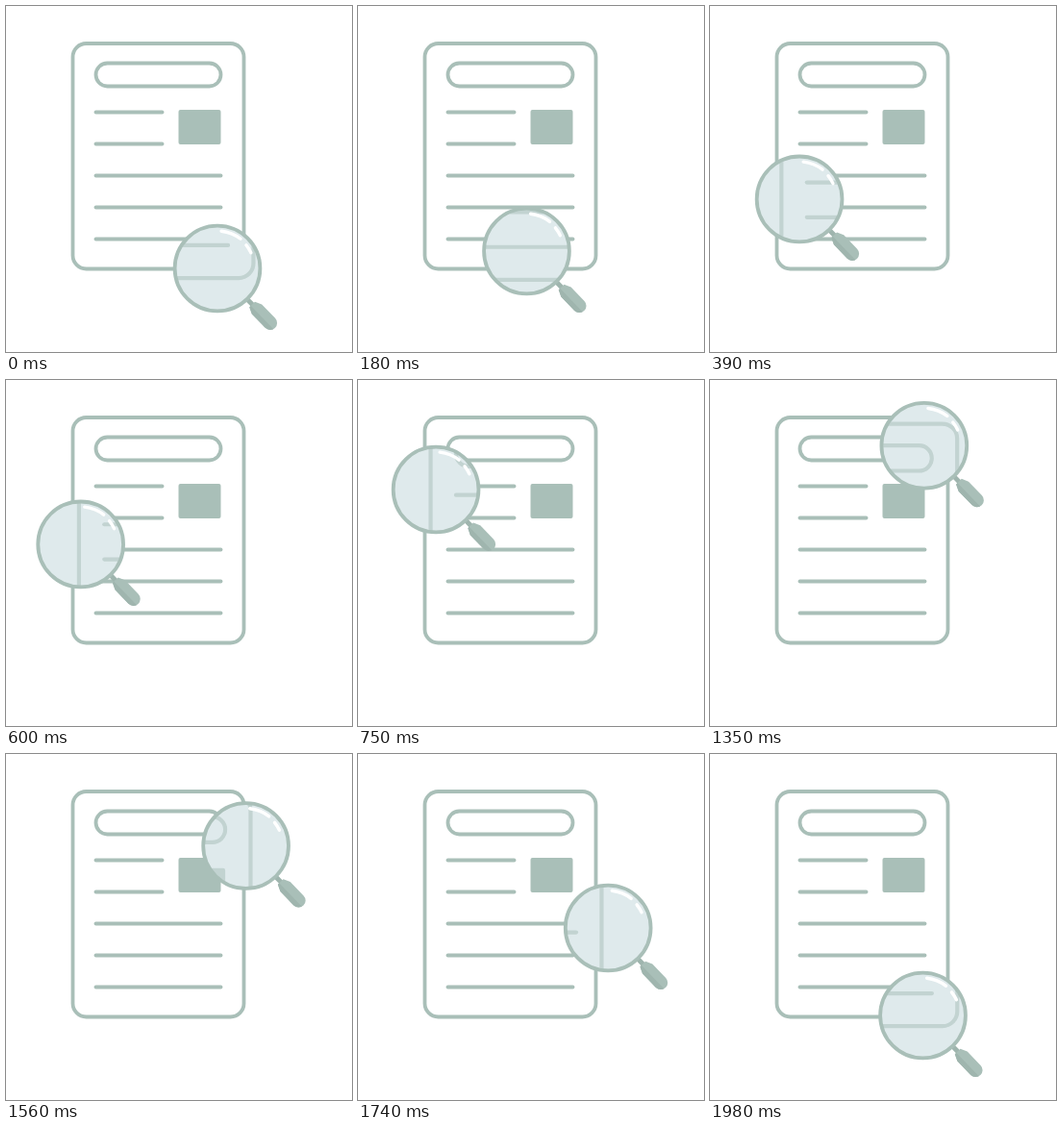
Animation, 360 px wide and 360 px high, one loop 2.01 s. Source, as an HTML page with a canvas:

```html
<!DOCTYPE html>
<html lang="en">
<head>
<meta charset="utf-8">
<title>Document search</title>
<style>
  html, body { margin: 0; width: 100%; height: 100%; overflow: hidden; background: #fff; }
  canvas { display: block; width: 360px; height: 360px; filter: blur(.45px); }
</style>
</head>
<body>
<canvas id="stage"></canvas>
<script>
const LOOP = 2010, STEP = 30, SIZE = 360, ZOOM = 1.1;
const INK = '#a9bfb8', SHADE = '#9fb5ae', GLASS = '#dfeaec', FAINT = '#c2d3d1';

const canvas = document.getElementById('stage');
const ctx = canvas.getContext('2d');
const ratio = window.devicePixelRatio || 1;
canvas.width = canvas.height = SIZE * ratio;

// Closed path of the lens centre: a rest point and the two handles that follow it
const path = [
  [[220, 273], [175, 258], [103, 222.5]],
  [[83, 187.5], [60, 130], [89, 84]],
  [[123, 71], [181, 56], [211, 48]],
  [[248, 90], [266, 150], [270, 243]]
];

const ease = t => t * t * (3 - 2 * t);
const mix = (a, b, t) => a.map((v, k) => v + (b[k] - v) * t);

function bezier(points, t) {
  while (points.length > 1) {
    points = points.slice(1).map((p, i) => mix(points[i], p, t));
  }
  return points[0];
}

function lensAt(ms) {
  const u = ms / LOOP * path.length;
  const i = Math.floor(u);
  const next = path[(i + 1) % path.length][0];
  return bezier([...path[i], next], ease(u - i));
}

function box(x, y, w, h, r) {
  ctx.beginPath();
  ctx.roundRect(x, y, w, h, r);
}

function line(x1, x2, y) {
  ctx.beginPath();
  ctx.moveTo(x1, y);
  ctx.lineTo(x2, y);
  ctx.stroke();
}

function arc(r, from, to) {
  ctx.beginPath();
  ctx.arc(0, 0, r, from * Math.PI / 180, to * Math.PI / 180);
}

function sheet(color) {
  const left = 93.5, wide = 130;
  ctx.strokeStyle = ctx.fillStyle = color;
  ctx.lineWidth = 3.8;
  ctx.lineCap = 'round';
  box(69.5, 39, 178, 234.5, 14);
  ctx.stroke();
  box(left, 59.5, wide, 24, 12);
  ctx.stroke();
  box(179.5, 108, 44, 36, 2);
  ctx.fill();
  for (let i = 0; i < 5; i++) {
    line(left, left + (i < 2 ? 69 : wide), 110.5 + 33 * i);
  }
}

function handle() {
  ctx.save();
  ctx.rotate(46 * Math.PI / 180);
  ctx.fillStyle = SHADE;
  ctx.fillRect(44, -2.5, 12, 5);
  ctx.beginPath();
  ctx.moveTo(52, -4);
  ctx.lineTo(59, -7.2);
  ctx.lineTo(79, -7.2);
  ctx.arc(79, 0, 7.2, -Math.PI / 2, Math.PI / 2);
  ctx.lineTo(59, 7.2);
  ctx.lineTo(52, 4);
  ctx.fillStyle = INK;
  ctx.fill();
  ctx.clip();
  ctx.fillStyle = SHADE;
  ctx.fillRect(52, 2, 36, 6);
  ctx.restore();
}

function lens([x, y]) {
  ctx.save();
  ctx.translate(x, y);
  handle();

  // The glass shows the page enlarged about its centre and shifted
  ctx.save();
  arc(44.5, 0, 360);
  ctx.fillStyle = GLASS;
  ctx.fill();
  ctx.clip();
  ctx.translate(7.2, 9.5);
  ctx.scale(ZOOM, ZOOM);
  ctx.translate(-x, -y);
  sheet(FAINT);
  ctx.restore();

  ctx.strokeStyle = INK;
  ctx.lineWidth = 3.8;
  arc(44.4, 0, 360);
  ctx.stroke();

  ctx.strokeStyle = '#fff';
  ctx.lineCap = 'round';
  ctx.lineWidth = 3.4;
  arc(39, -84, -52);
  ctx.stroke();
  arc(38.5, -39, -25);
  ctx.stroke();
  ctx.restore();
}

function draw(now) {
  const ms = Math.floor(now % LOOP / STEP) * STEP;
  ctx.setTransform(ratio, 0, 0, ratio, 0, 0);
  ctx.fillStyle = '#fff';
  ctx.fillRect(0, 0, SIZE, SIZE);
  sheet(INK);
  lens(lensAt(ms));
}

let start;
function tick(now) {
  if (start === undefined) start = now;
  draw(Math.max(0, now - start));
  requestAnimationFrame(tick);
}
draw(0);
requestAnimationFrame(tick);
</script>
</body>
</html>
```
